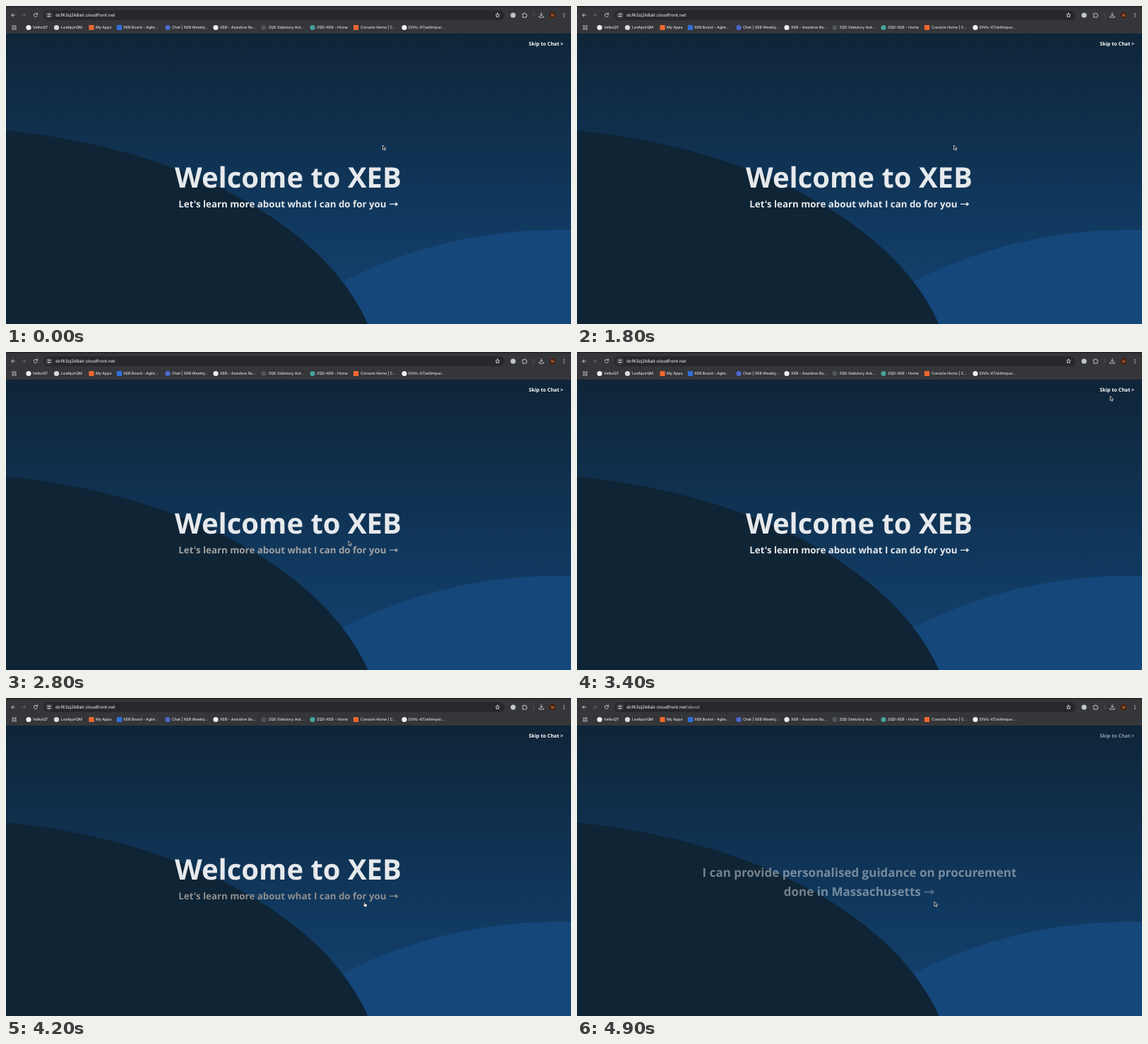
Recreate the animation shown at these times as an HTML page. Size 800 px wide and 450 px high, loop 5 s.

```html
<!DOCTYPE html>
<html lang="en">
<head>
<meta charset="utf-8">
<title>Welcome</title>
<style>
  html, body { margin: 0; width: 100%; height: 100%; overflow: hidden; background: #10263a; }
  svg { display: block; width: 800px; height: 450px; }
  text { text-rendering: geometricPrecision; white-space: pre; }
  .page text { font-family: "Open Sans", "Noto Sans", sans-serif; font-weight: 700; }
  .bar text { font-family: Inter, Roboto, sans-serif; fill: #dfe1e5; font-weight: 500; }
  .icons { fill: none; stroke: #d0d3d8; stroke-width: .9; stroke-linecap: round; stroke-linejoin: round; }
</style>
</head>
<body>
<svg viewBox="0 0 800 450">
  <defs>
    <linearGradient id="sky" x1="0" y1="0" x2="0" y2="1">
      <stop offset="0" stop-color="#0f2538"/>
      <stop offset=".55" stop-color="#10365a"/>
      <stop offset="1" stop-color="#144372"/>
    </linearGradient>
  </defs>

  <g class="page">
    <rect y="39" width="800" height="411" fill="url(#sky)"/>
    <circle cx="780" cy="981.7" r="665" fill="#15477b"/>
    <ellipse cx="-107" cy="541" rx="639" ry="370" fill="#0f2435"/>
    <text id="skip" x="789.2" y="56.4" font-size="7.15" text-anchor="end" fill="#fff">Skip to Chat &gt;</text>

    <g id="welcome">
      <text x="399.5" y="257" font-size="40" text-anchor="middle" fill="#e6e9ec">Welcome to XEB</text>
      <g id="learn">
        <text x="244.3" y="285.2" font-size="13.33">Let's learn more about what I can do for you</text>
        <path d="M543 279.7H551.4V277.2L555.3 280.4L551.4 283.6V281.1H543Z"/>
      </g>
    </g>

    <g id="about" fill="#e6e9ec">
      <text x="400" y="253.3" font-size="17" text-anchor="middle">I can provide personalised guidance on procurement</text>
      <text x="292.8" y="280.3" font-size="17">done in Massachusetts</text>
      <path opacity=".65" d="M491.5 273.6H501.5V270.5L506 274.5L501.5 278.5V275.4H491.5Z"/>
    </g>
  </g>

  <g class="bar">
    <rect width="800" height="39" fill="#35363a"/>
    <rect width="800" height="1.3" fill="#1e1f23"/>
    <rect x="53" y="6" width="653" height="14" rx="7" fill="#27282c"/>
    <circle cx="61" cy="13" r="5.3" fill="#3b3c41"/>
    <g class="icons">
      <path d="M12.5 13H8M10 10.7L7.7 13L10 15.3"/>
      <path stroke="#66696e" d="M23 13H27.5M25.5 10.7L27.8 13L25.5 15.3"/>
      <path d="M44 11.4A2.5 2.5 0 1 0 44.3 13.8M44.5 10V11.8H42.7"/>
      <path d="M58.7 11.5H60.3M62.2 11.5H63.3M58.7 14.5H59.8M61.7 14.5H63.3"/>
      <circle cx="61.5" cy="11.5" r=".7"/><circle cx="60.5" cy="14.5" r=".7"/>
      <path d="M696 10L696.9 12L699 12.2L697.4 13.6L697.9 15.8L696 14.6L694.1 15.8L694.6 13.6L693 12.2L695.1 12Z"/>
      <path d="M731.5 11H733.2A1 1 0 0 1 735.2 11H736.8V12.7A1 1 0 0 1 736.8 14.7V16H731.5V14.5A1 1 0 0 0 731.5 12.6Z"/>
      <path stroke="#55575c" d="M747 10V16"/>
      <path d="M758 9.5V13.5M756.3 12L758 13.7L759.7 12M754.8 14.3V16H761.2V14.3"/>
    </g>
    <circle cx="718" cy="13" r="3.6" fill="#c3c6c9"/>
    <circle cx="774" cy="13" r="4.6" fill="#482313"/>
    <text x="774" y="14.8" font-size="5" text-anchor="middle" style="fill:#df8248">M</text>
    <g fill="#d0d3d8"><circle cx="790" cy="10.7" r=".75"/><circle cx="790" cy="13" r=".75"/><circle cx="790" cy="15.3" r=".75"/></g>
    <text x="70" y="15.2" font-size="6.2">dcf43zj2k8alr.cloudfront.net<tspan id="route" fill="#aeb1b6">/about</tspan></text>
    <path fill="none" stroke="#c9ccd0" stroke-width=".7" d="M8.8 27.8h2v2h-2zM12.3 27.8h2v2h-2zM8.8 31.3h2v2h-2zM12.3 31.3h2v2h-2z"/>
    <g id="bookmarks"></g>
  </g>

  <g id="cursor">
    <path id="arrow" d="M0 0V6.3L1.5 5L2.5 7.2L3.6 6.7L2.7 4.6H4.5Z" fill="#111" stroke="#fff" stroke-width=".7" stroke-linejoin="round"/>
    <path id="hand" d="M1 .8Q1.6 .2 2.1 1V3L4.5 3.5Q5.4 3.8 5.1 5L4.5 7.3H1.8L-.2 4.8Q0 3.9 1 4.5Z" fill="#fff" stroke="#222" stroke-width=".5" stroke-linejoin="round"/>
  </g>
</svg>
<script>
const LOOP = 5000, STEP = 100;
const get = id => document.getElementById(id);
const clamp = v => Math.max(0, Math.min(1, v));
const ramp = (t, from, to) => clamp((t - from) / (to - from));
const ease = p => p * p * (3 - 2 * p);
const mix = (a, b, p) => a + (b - a) * p;

// label, text x, icon x, icon colour, square icon
const bookmarks = [
  ["VelkoQT", 38, 32, "#f1f2f3"],
  ["LeafquirQM", 78, 71.5, "#d8dadd"],
  ["My Apps", 127, 121, "#ef682f", true],
  ["XEB Board - Agile...", 166, 160.5, "#2f6fd8", true],
  ["Chat | XEB Weekly...", 235, 229, "#4c68d0"],
  ["XEB - Assistive Bu...", 303, 297, "#eceef0"],
  ["ZQD Statutory Aut...", 371.5, 365, "#505359"],
  ["ZQD-XEB - Home", 440, 434, "#45a39d"],
  ["Console Home | C...", 502, 495.5, "#f0672f", true],
  ["DIVIL-47/ai4impac...", 570, 564, "#f1f2f3"]
];
get("bookmarks").innerHTML = bookmarks.map(([label, x, iconX, color, square]) =>
  `<rect x="${iconX - 3.6}" y="26.9" width="7.2" height="7.2" rx="${square ? .4 : 3.6}" fill="${color}"/>
   <text x="${x}" y="32.4" font-size="5.3">${label}</text>`).join("");

// time, x, y of the pointer tip
const path = [
  [0, 533.5, 197], [2200, 533.5, 197], [2700, 485, 267.5], [2850, 485, 267.5],
  [3300, 755, 62.5], [3450, 755, 62.5], [3900, 505, 280], [4050, 506, 288.3], [LOOP, 506, 288.3]
];

function pointer(t) {
  const i = path.findIndex((p, n) => n && t <= p[0]);
  const [t0, x0, y0] = path[i - 1], [t1, x1, y1] = path[i];
  const p = ease(ramp(t, t0, t1));
  return [mix(x0, x1, p), mix(y0, y1, p)];
}

function draw(now) {
  const t = Math.floor(now % LOOP / STEP) * STEP;
  const [x, y] = pointer(t);
  get("cursor").setAttribute("transform", `translate(${x} ${y})`);
  const pointing = t >= 4000 && t < 4500;
  get("arrow").style.display = pointing ? "none" : "";
  get("hand").style.display = pointing ? "" : "none";

  const hover = .8 * ramp(t, 2500, 2800) * (1 - ramp(t, 2900, 3200)) + ramp(t, 3800, 4100);
  const shade = [[229, 143], [232, 143], [235, 143]].map(([a, b]) => Math.round(mix(a, b, hover)));
  get("learn").style.fill = `rgb(${shade})`;

  const leaving = 1 - ramp(t, 4300, 4700);
  const entering = ramp(t, 4700, 5100);
  get("welcome").style.opacity = leaving;
  get("about").style.opacity = entering * .95;
  get("skip").style.opacity = Math.max(leaving, entering * 1.1);
  get("route").style.display = t >= 4500 ? "" : "none";
}

const start = performance.now();
function frame() {
  draw(performance.now() - start);
  requestAnimationFrame(frame);
}
draw(0);
requestAnimationFrame(frame);
</script>
</body>
</html>
```
